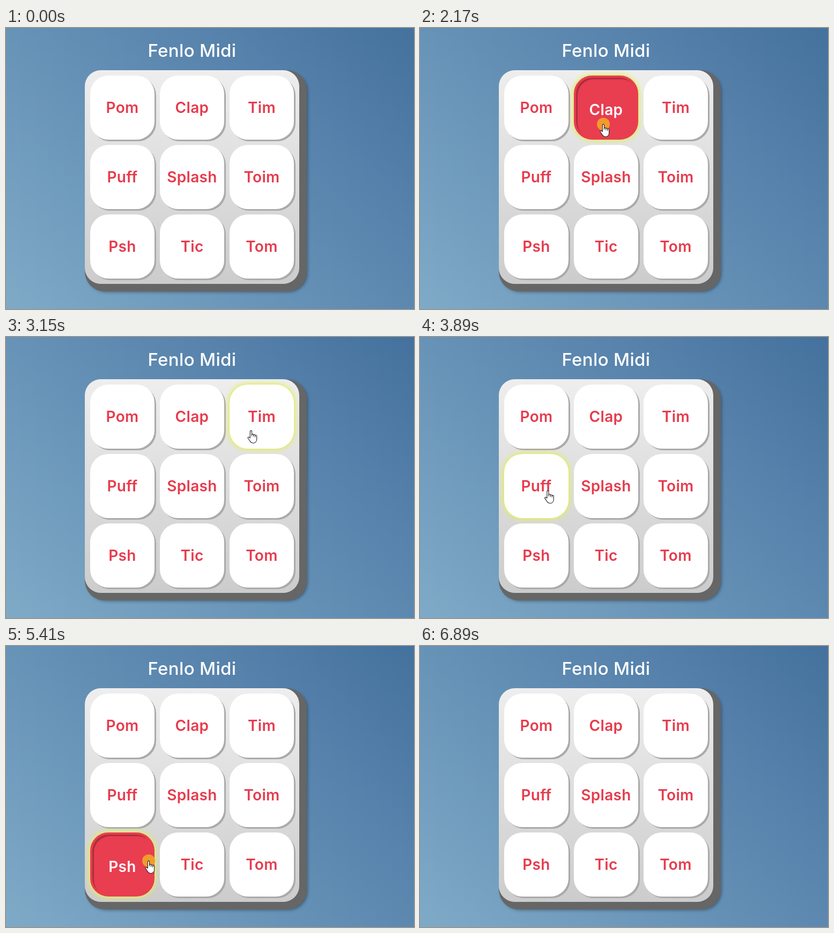
Write an HTML page that moves like this. It is 761 by 526 pixels and loops after 6.96 s.

```html
<!DOCTYPE html>
<html lang="pt">
<head>
<meta charset="utf-8">
<title>Fenlo Midi</title>
<style>
html, body { margin: 0; width: 100%; height: 100%; overflow: hidden; }
body {
  position: relative;
  background: linear-gradient(45deg, #7faac7, #5581ab 72%, #44719d);
  font-family: Inter, sans-serif;
  letter-spacing: .02em;
}
h1 {
  position: absolute; left: 147px; top: 22px; width: 400px; margin: 0;
  font-size: 33px; font-weight: 500; line-height: 40px;
  text-align: center; color: #fff;
}
#board {
  --glow: 0 0 2px 1px #e2ec78, 0 0 10px 2px #e2ee66;
  position: absolute; left: 147px; top: 79px; width: 400px; height: 400px;
  border-radius: 30px;
  background: linear-gradient(#eee, #ccc);
  box-shadow: 7px 7px 0 7px #666, 10px 10px 6px 5px rgba(0, 0, 0, .4);
}
.key {
  position: absolute; box-sizing: border-box; width: 120px; height: 120px;
  border-radius: 34px; background: #fff; color: #e63c4d;
  font-size: 28px; font-weight: 600; line-height: 120px;
  text-align: center; white-space: nowrap;
  box-shadow: 3px 3px 0 #aaa;
}
.focus { box-shadow: var(--glow); }
.press {
  border: 4px solid #e93d50; background: #e93d50; color: #fff;
  box-shadow: inset 3px 3px 0 #ae2e3c, var(--glow);
}
svg { position: absolute; left: 0; top: 0; }
</style>
</head>
<body>
<h1>Fenlo Midi</h1>
<div id="board"></div>
<svg width="761" height="526">
  <g id="cursor" stroke="#1c1c24" stroke-width="1.1" stroke-linejoin="round" fill="#fff">
    <circle id="click" r="12" fill="#f39a2c" stroke="none"/>
    <path id="hand" d="M-1.7 14V1.7a1.6 1.6 0 0 1 3.2 0V10V8.2a1.6 1.6 0 0 1 3.2 0V11V9a1.5 1.5 0 0 1 3 0V12V10.2a1.5 1.5 0 0 1 3 0V16c0 5-3 7.5-6.5 7.5c-4 0-5.5-2-7-5L-5.7 14.5c-1-2 1.2-3 2.5-1.5Z"/>
    <path id="arrow" d="M0 0V17L4 13.2L6.8 19.5L9.2 18.5L6.5 12.3H12Z"/>
  </g>
</svg>
<script>
const LOOP = 6960, STEP = 70, HOLD = 140, TRAVEL = 350;
const ENTER = 490, LEAVE = 6360, BLUR = 6890;
const $ = id => document.getElementById(id);

// name, press time, pointer offset from the key's centre
const keys = [
  ['Pom', 1360, 5, 19], ['Clap', 2160, -5, 31], ['Tim', 2880, -20, 26],
  ['Puff', 3630, 5, 11], ['Splash', 4170, 18, -9], ['Toim', 4650, -28, 2],
  ['Psh', 5340, 49, -7], ['Tic', 5760, 0, -4], ['Tom', 6150, -7, -7]
].map(([name, down, dx, dy], i) => {
  const el = document.createElement('div');
  const left = 10 + i % 3 * 130, top = 10 + Math.floor(i / 3) * 130;
  el.textContent = name;
  el.style.left = left + 'px';
  el.style.top = top + 'px';
  $('board').append(el);
  return { el, down, up: down + HOLD, x: 207 + left + dx, y: 139 + top + dy };
});

// eased progress, advancing in steps like a screen capture
function progress(t, start, end) {
  const held = Math.floor((t - start) / STEP) * STEP;
  const p = t >= end ? 1 : Math.max(0, held / (end - start));
  return p * p * (3 - 2 * p);
}

// the pointer glides in, then leaves each key for the next; along the top row it dips
function pointer(t) {
  let x = 448, y = 504;
  keys.forEach((key, i) => {
    const end = i ? key.down - STEP : ENTER + 600;
    const start = i ? Math.max(keys[i - 1].up, end - TRAVEL) : ENTER;
    const p = progress(t, start, end);
    const dip = i === 1 || i === 2 ? 30 : 0;
    x += (key.x - x) * p;
    y += (key.y - y) * p + dip * Math.sin(Math.PI * p);
  });
  return [x, y];
}

const inKey = (v, origin) => v >= origin && v < origin + 380 && (v - origin) % 130 < 120;
const show = (id, on) => $(id).setAttribute('visibility', on ? 'visible' : 'hidden');

function draw(now) {
  const t = now % LOOP;
  const last = keys.findLastIndex(key => t >= key.down && t < BLUR);
  const pressed = last >= 0 && t < keys[last].up;
  keys.forEach(({ el }, i) => {
    el.className = 'key' + (i !== last ? '' : pressed ? ' press' : ' focus');
  });
  const [x, y] = pointer(t);
  const visible = t >= ENTER && t < LEAVE;
  const over = inKey(x, 157) && inKey(y, 89);
  $('cursor').setAttribute('transform', `translate(${x} ${y})`);
  show('click', visible && pressed);
  show('hand', visible && over);
  show('arrow', visible && !over);
  requestAnimationFrame(() => draw(performance.now() - began));
}
const began = performance.now();
draw(0);
</script>
</body>
</html>
```
